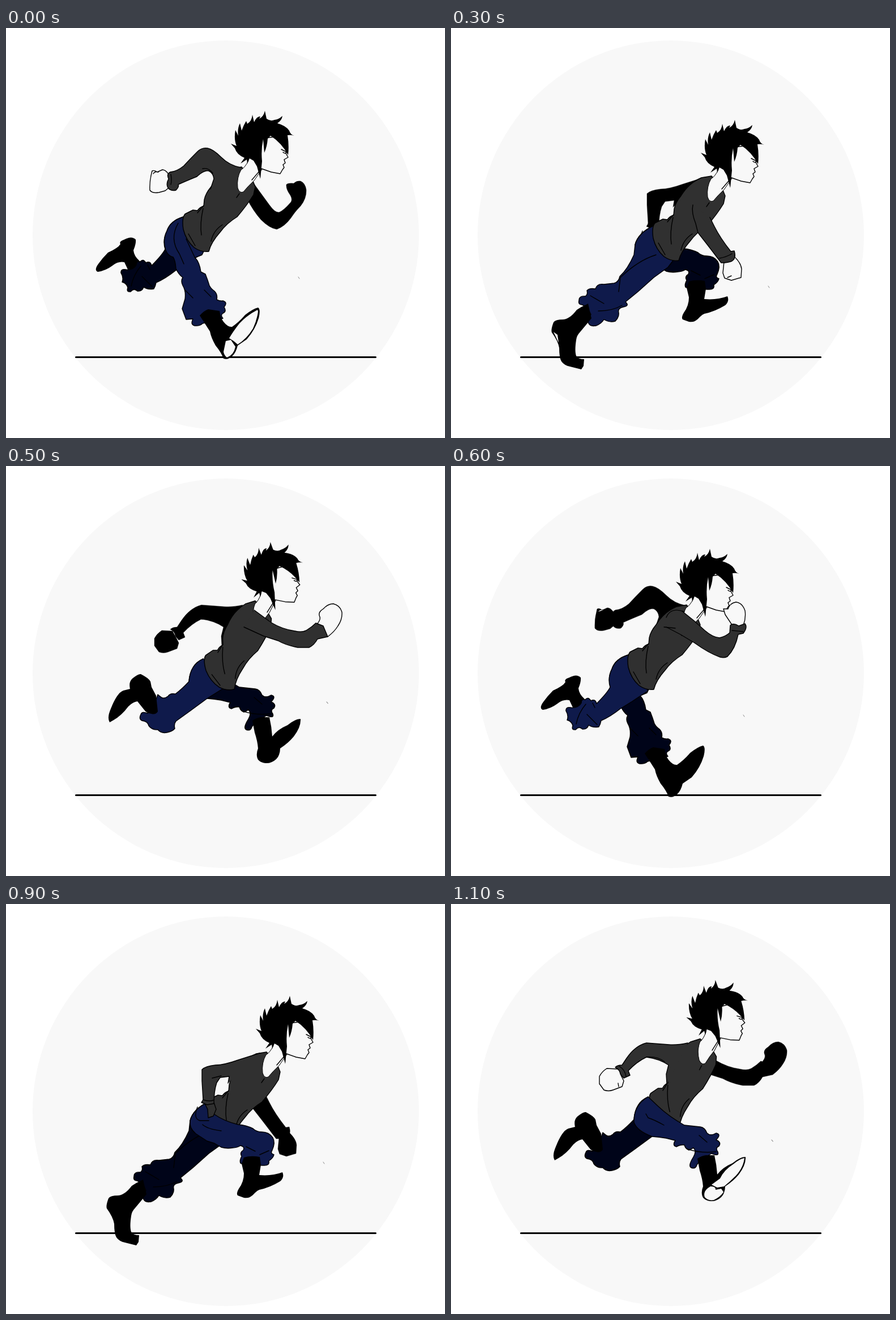
An HTML page without scripts that plays this animation: 775 by 723 pixels, repeating every 1200 ms.

```html
<!DOCTYPE html>
<html lang="en">
<head>
<meta charset="utf-8">
<title>Run cycle</title>
<style>
html, body { margin: 0; width: 100%; height: 100%; overflow: hidden; background: #fff; }
svg { display: block; width: 100%; height: 100%; }
path { stroke: #000; stroke-width: 1.4; stroke-linejoin: round; stroke-linecap: round; }
.near { --s: #303030; --p: #0f1a4b; --w: #f8f8f8; --line: 1.4; }
.far { --s: #000; --p: #000419; --w: #000; --line: .4; }
.s { fill: var(--s); stroke-width: var(--line); }
.p { fill: var(--p); }
.w { fill: var(--w); stroke-width: var(--line); }
.n { fill: none; }
.ink { stroke: none; }
.sole { fill: var(--w); stroke: none; }
.shirt { fill: #303030; }
.skin { fill: #f8f8f8; }
.pose { visibility: hidden; animation: show 1.2s step-end infinite; animation-delay: calc(var(--i) * 100ms - 1200ms); }
@keyframes show {
  0% { visibility: visible; }
  8.33333%, 100% { visibility: hidden; }
}
</style>
</head>
<body>
<svg viewBox="0 0 775 723">
<defs>
  <!-- torso and head move as one piece -->
  <g id="body">
    <path class="shirt" d="M416 245L398 248Q375 258 362 280Q352 292 350 303L349 314Q342 316 338 322L330 321L316 328Q310 335 313 355Q318 375 332 387Q345 396 358 394Q362 378 378 360Q390 344 408 333Q426 312 437 294L440 280L436 270Z"/>
    <path class="n" d="M349 313L338 326M348 318Q342 345 345 365M322 363L334 384M382 347Q366 357 362 376M412 292l-5 7"/>
    <path class="skin" style="stroke-width:1" d="M428 234Q422 246 415 250Q407 264 409 282Q412 292 419 289Q428 278 438 269L452 249"/>
    <path class="skin" d="M450 195L490 190L496 212L494 221L498 228L491 232L493 238L489 241L491 246L488 250L484 257L468 254L451 248L434 268"/>
    <path class="ink" d="M509 190Q503 188 497 189Q500 207 498 224Q487 203 467 190L462 195Q461 209 456 220L454 196Q450 215 452 235L449 266L443 244L437 234L430 230L426 239L425 232L414 239L421 229Q407 223 404 212L397 204L407 208Q402 196 405 180L410 190Q408 178 413 168L416 181Q419 172 424 164L426 169Q434 164 435 153L438 166Q443 155 449 156L447 160Q455 156 457 146L460 160Q467 165 474 162Q482 161 488 155Q487 163 479 168Q494 172 500 181Q502 188 509 190Z"/>
    <path class="n" d="M486 214l8 4M489 219q3 3 6 1"/>
    <path class="n" style="stroke:#888;stroke-width:1" d="M516 439l2 3"/>
  </g>
  <use id="body-b" href="#body" transform="translate(-23 41) rotate(-5 457 148)"/>
  <use id="body-c" href="#body" transform="translate(12 32) rotate(-2 457 148)"/>
  <use id="body-d" href="#body" transform="translate(44 16)"/>
  <use id="body-e" href="#body" transform="translate(10 -28) rotate(-7 457 148)"/>
  <use id="body-f" href="#body" transform="translate(10 -12) rotate(-8 457 148)"/>

  <!-- contact -->
  <g id="a-arm-back">
    <path class="w" d="M287 258Q282 250 276 250L267 254Q262 250 258 252Q253 270 254 286Q258 292 270 290L281 287L287 282M260 257q3-5 9-3"/>
    <path class="s" d="M414 246Q394 242 380 228Q366 214 356 212Q346 210 338 218Q324 232 314 243Q302 253 290 254Q283 257 287 266Q282 275 286 282Q291 288 300 286Q306 280 304 276Q322 268 337 262Q350 250 358 252Q366 256 367 266L361 284"/>
    <path class="n" d="M347 248q11-2 18 8M291 258q2 10 0 18"/>
  </g>
  <path id="a-arm-far" class="s" d="M438 275Q446 286 465 312Q475 326 482 325Q490 322 503 307Q506 302 502 295Q494 284 495 276Q498 273 508 274Q513 269 520 270Q528 273 530 285Q531 300 520 314Q510 324 503 335Q492 350 478 355Q465 353 450 338Q436 322 426 302Z"/>
  <g id="a-arm-front">
    <path class="w" d="M496 280L484 262L481 252L489 252Q492 242 503 240Q514 241 519 255Q521 268 516 281"/>
    <path class="s" d="M408 256L428 272L448 290Q462 302 474 303Q486 300 492 294L493 281Q498 276 508 282L519 278Q524 285 516 295L507 297Q502 322 488 336Q482 339 475 337Q455 330 430 312L405 297L380 284"/>
    <path class="n" d="M380 267Q388 248 412 257M376 284l20 2M496 290l20 2"/>
  </g>
  <g id="a-leg-front">
    <path class="p" d="M313 333Q290 340 284 358Q276 374 282 392Q286 402 295 404Q299 410 300 424Q304 434 312 440Q308 446 312 454Q318 464 316 478L311 495L318 514L330 513Q325 523 333 525Q342 526 347 521L383 512Q378 506 383 503Q390 500 385 492Q392 484 383 481Q378 482 372 479Q374 470 368 464Q362 460 359 454Q356 444 352 434L344 430Q342 414 334 405L346 400L350 392"/>
    <path class="n" d="M304 344Q288 372 306 398L314 416M318 372l16 34M316 462l14 14M350 462l12 12"/>
    <path class="ink" d="M342 507Q350 498 357 496L377 499Q379 512 384 518Q392 528 399 527Q412 518 422 506Q436 495 445 493Q450 496 446 512Q440 532 425 549L409 560Q406 572 400 578Q392 586 384 583Q380 572 370 560Q362 546 360 535Z"/>
    <path class="sole" d="M444 497Q426 506 412 521Q401 535 394 547Q403 552 409 558Q425 548 436 530Q443 515 445 500ZM388 552L397 550L405 562Q402 577 390 581Q385 577 384 571Z"/>
  </g>
  <g id="a-leg-back">
    <path class="ink" d="M162 430Q155 427 163 416Q170 406 180 396Q198 388 202 381Q199 376 209 373Q222 366 229 373Q230 380 225 392Q226 402 235 410L245 425L218 432L209 413Q198 411 188 419Q176 428 162 430Z"/>
    <path class="p" d="M313 333Q290 340 284 358Q276 374 281 390Q276 400 257 419Q255 410 247 414Q242 406 237 412Q230 410 230 418Q225 427 212 426Q202 424 203 432Q208 440 205 448Q213 450 215 458Q212 466 220 465Q226 458 232 464Q240 465 243 457Q250 462 261 460Q264 455 265 449Q280 443 299 428L320 415L347 397"/>
    <path class="n" d="M238 420Q225 435 221 455M240 438l18 18M250 418l4 8"/>
  </g>

  <!-- down -->
  <g id="b-arm-back">
    <path class="w" d="M266 306L260 304L254 312Q248 312 246 308Q252 303 251 299Q244 294 236 297Q226 304 219 318Q220 328 230 334Q238 342 247 342L258 341L268 335"/>
    <path class="s" d="M388 290Q355 283 327 271Q305 278 295 286Q280 301 262 305L266 318L262 334Q282 334 300 323Q315 311 325 308L345 308L360 314"/>
  </g>
  <g id="b-arm-front">
    <path class="ink" d="M517 334Q512 326 514 317Q516 304 526 302L535 308Q540 305 548 306Q556 310 554 318Q550 336 543 346L534 348Z"/>
    <path class="s" d="M386 291Q370 294 361 303Q354 312 362 322Q385 339 415 350Q440 364 472 378Q490 374 510 360L530 353L536 346L528 342L526 334L512 330Q490 346 475 346Q455 337 440 326Q420 312 407 294"/>
    <path class="n" d="M508 340l20 6M404 342l-6 6"/>
  </g>
  <g id="b-leg-back">
    <path class="ink" d="M280 480Q266 478 259 473L258 463Q246 455 239 455Q230 456 226 462Q220 474 217 482L220 484Q200 498 187 520Q182 534 190 534Q200 532 206 520Q212 513 224 508Q234 503 245 503L268 508L280 502Z"/>
    <path class="p" d="M305 384Q280 392 277 412Q275 428 279 446Q283 456 292 462L297 474Q286 470 277 474Q270 484 277 492Q272 504 268 513Q268 522 276 524Q284 522 288 516Q296 526 302 522Q306 514 312 514L330 518L350 520Q365 512 362 500Q372 490 362 482Q354 474 348 477Q346 470 340 466L344 446"/>
    <path class="n" d="M296 396Q288 420 307 440L323 468M314 430l18 32M297 474l10 14"/>
  </g>
  <g id="b-leg-front">
    <path class="ink" d="M316 516Q306 540 290 560Q280 568 276 576Q276 583 286 582Q300 581 310 583Q328 589 345 589L370 588Q376 584 370 578Q360 570 345 568L330 564Q326 555 335 545L342 526Z"/>
    <path class="p" d="M305 384Q280 392 277 412Q275 428 279 446L292 470L305 500L310 519L328 520Q334 528 342 527Q340 537 347 538Q355 538 355 526Q362 526 368 524Q372 518 369 514Q376 508 366 502Q370 490 362 482L340 466L344 446"/>
  </g>

  <!-- passing -->
  <g id="c-arm-back">
    <path class="w" d="M346 368L342 384Q344 396 352 396L366 394L371 382L366 368"/>
    <path class="s" d="M420 276L390 280L355 296L329 322L332 345L343 371L368 372L360 344L362 330L385 314L398 310"/>
  </g>
  <g id="c-arm-front">
    <path class="w" d="M506 350L516 342L530 350L532 368L520 378L508 374"/>
    <path class="s" d="M432 296L448 325L462 350L485 358L506 349L512 360L508 377L485 386L460 388L434 366L412 340L404 320"/>
  </g>
  <g id="c-leg-back">
    <path class="p" d="M331 368Q304 376 302 398Q296 430 282 460Q272 468 270 475L262 500Q254 512 262 520Q270 514 275 520Q280 534 290 528Q298 518 310 528L324 512L345 472L378 426"/>
    <path class="ink" d="M268 514L255 545L232 570Q230 584 245 586L300 590Q314 586 304 577L275 566L284 548L304 520Z"/>
  </g>
  <g id="c-leg-front">
    <path class="ink" d="M358 498L328 512L308 516L298 540Q290 566 300 570L312 560L322 545L345 540L378 515Z"/>
    <path class="p" d="M331 368Q304 376 302 398Q306 425 330 445L350 466Q352 478 340 488Q336 500 345 515Q354 506 362 510Q372 524 386 510Q390 496 402 490Q408 478 418 468Q418 458 412 450L400 440L378 426"/>
    <path class="n" d="M322 385Q316 410 345 430M372 470l10 16"/>
  </g>

  <!-- push -->
  <g id="d-arm-back">
    <path class="s" d="M350 350L356 362L357 377L366 374L371 362L367 350Z"/>
    <path class="s" d="M448 263L410 275Q385 284 370 284Q352 286 346 292L346 312L348 345L345 350L355 354L367 352Q367 330 372 315L378 306L394 304L392 316"/>
    <path class="n" d="M348 345q10 4 18 1M364 307l16-4"/>
  </g>
  <g id="d-arm-front">
    <path class="w" d="M499 402Q512 414 513 425L512 440L495 445L483 441L480 432L482 412M488 440l7-3"/>
    <path class="s" d="M427 312Q424 325 432 345L436 361Q455 385 470 405L477 414Q490 414 496 411Q504 406 500 393L494 394Q475 370 465 350L457 334"/>
    <path class="n" d="M474 406q12-2 22-8"/>
  </g>
  <g id="d-leg-back">
    <path class="p" d="M357 349Q330 362 325 382L323 400Q312 425 298 438Q296 448 288 450L270 452Q258 450 255 460Q244 458 240 463Q242 470 237 473Q226 472 226 480Q224 488 231 488Q240 490 247 505Q240 516 243 521Q246 527 256 525Q265 522 270 514Q280 520 290 517Q297 510 296 502Q294 494 304 492Q316 490 308 483L330 465L358 440L383 422L392 410"/>
    <path class="n" d="M362 400Q330 410 299 440L296 465M246 472l24 14M260 499q25 0 42-10"/>
    <path class="ink" d="M242 486L230 492L222 497Q210 513 198 514Q184 514 181 519Q176 532 178 537Q189 552 191 564Q191 582 195 588Q200 595 210 597L230 602L234 596L235 584Q224 584 221 578Q218 570 221 550Q222 542 228 536Q238 524 248 512Z"/>
    <path class="sole" d="M181 536L188 541L190 555Z"/>
  </g>
  <g id="d-leg-front">
    <path class="p" d="M357 349Q330 362 325 382Q323 395 335 405L355 418L368 422L380 429Q390 432 400 430Q408 430 414 426Q422 428 419 434Q412 438 416 445Q412 452 414 457Q424 462 430 457L440 454Q446 462 454 461Q466 462 464 453Q472 448 473 442Q466 440 470 434Q476 420 471 412Q464 402 452 402Q442 402 436 396Q424 390 410 389Q385 383 368 371"/>
    <path class="n" d="M347 389Q356 397 380 400M338 358Q330 378 342 382L358 382M424 428l16 8M448 442l16-7"/>
    <path class="ink" d="M420 447Q432 443 448 446L450 460L447 478Q470 480 488 473Q492 482 484 489Q466 500 447 504Q442 506 438 511Q430 520 420 518L409 514Q406 510 411 502Q420 490 420 475L416 458Z"/>
  </g>

  <!-- leap -->
  <g id="e-arm-back">
    <path class="w" d="M296 296L283 312Q281 322 284 330L292 342L308 343Q320 340 322 332L320 320L312 315L318 305"/>
    <path class="s" d="M412 236L380 243L330 250Q320 262 310 276L290 302L315 309Q320 294 333 285Q344 273 355 272L386 269"/>
  </g>
  <g id="e-arm-front">
    <path class="w" d="M563 256Q558 244 567 234L575 241L590 242L605 248L598 262L592 278L574 279M567 234L569 244"/>
    <path class="s" d="M434 236L450 246L480 260L495 268L510 268L540 262L560 257L565 254L572 262L575 280L566 287L535 292L500 306L480 300L455 288L440 280L417 271"/>
    <path class="n" d="M562 258q6 10 4 24"/>
  </g>
  <g id="e-leg-back">
    <path class="p" d="M346 321Q325 330 312 345L300 365L284 378Q278 370 268 371Q256 374 252 378Q244 380 238 386Q226 384 227 392Q230 399 237 401Q230 412 240 416Q248 420 256 429Q266 426 272 418L283 420L300 407L340 392L370 380L388 383"/>
    <path class="n" d="M306 363Q290 372 281 394M265 414q12 5 20 3"/>
    <path class="ink" d="M235 388L234 370L230 362L205 365L171 367Q178 350 195 335L228 327L240 315L258 314L262 345L259 386Z"/>
    <path class="sole" d="M174 364Q180 348 197 337L227 329L224 335L200 344L182 362ZM229 322L240 317L256 315L254 320L232 328Z"/>
  </g>
  <g id="e-leg-front">
    <path class="p" d="M346 321L390 345Q430 330 455 325Q464 320 470 324Q474 316 482 317Q494 318 497 328Q492 336 497 342Q500 350 494 358Q500 370 488 373L475 368L462 375Q452 378 449 368Q440 372 425 370Q416 368 410 373Q404 378 398 374L385 382L350 372"/>
    <path class="ink" d="M456 366L488 362L489 388L495 392Q515 380 526 368Q538 361 546 363Q546 374 528 398Q514 412 496 418L496 427Q485 434 475 436Q468 434 466 427L460 405Z"/>
  </g>

  <!-- float -->
  <g id="f-arm-back">
    <path class="w" d="M294 291L275 290Q266 296 262 304L262 317L270 328Q278 331 286 328L302 322L305 312L300 302M295 316l1 6"/>
    <path class="s" d="M418 245Q400 249 385 248L345 245Q325 250 310 272L302 284Q294 284 290 288Q298 292 299 300L305 307L316 302L313 294Q328 278 345 270Q368 273 384 284L380 300L381 318"/>
    <path class="n" d="M297 286q10 6 12 18M345 270q18-2 32 8"/>
  </g>
  <g id="f-arm-front">
    <path class="w" d="M547 281Q556 272 554 266Q550 258 560 252Q568 243 578 243Q590 246 593 258Q594 270 586 282Q580 292 568 301"/>
    <path class="s" d="M438 254L468 276Q488 288 510 291Q522 294 530 290Q540 284 547 277L560 282L568 301L550 305Q544 316 535 320L515 320Q494 316 480 308L455 300L420 284"/>
  </g>
  <g id="f-leg-back">
    <path class="p" d="M348 340Q325 350 323 380Q310 394 299 402Q290 400 286 406Q278 412 273 407L268 403L262 420L250 436Q240 432 238 438Q234 446 240 449Q250 450 252 458Q258 466 268 465Q274 472 284 470Q294 468 298 463Q296 455 300 450L325 432L355 410L395 385"/>
    <path class="ink" d="M265 405L268 433Q264 439 257 437Q248 436 244 430L232 415Q224 416 216 424Q204 440 190 448L183 452Q178 444 185 428Q196 400 207 396L219 393Q216 380 224 374Q234 366 238 367Q252 374 255 380L257 390Z"/>
  </g>
  <g id="f-leg-front">
    <path class="p" d="M348 340Q322 355 323 385Q328 400 355 410Q368 411 380 413L396 417Q390 426 398 428Q406 424 412 425Q414 432 420 434L428 430Q434 436 428 446Q418 462 424 465Q432 468 434 460L440 452L460 440Q474 446 471 437Q466 430 473 427Q478 420 468 416Q478 406 468 404Q458 410 452 404Q448 394 440 393L412 390Q385 375 366 357Z"/>
    <path class="n" d="M344 370l4 7Q358 380 376 390M417 432Q440 440 468 437M438 408l14 12"/>
    <path class="ink" d="M435 449Q442 444 450 443L465 443Q469 460 470 477Q480 464 497 457Q510 446 520 446Q521 460 508 477Q498 489 484 498Q484 510 477 517Q468 525 458 524Q444 522 443 512Q442 505 445 498Q444 485 439 470Z"/>
    <path class="sole" d="M518 448Q510 449 498 459Q482 469 475 484L460 495L470 500L482 498Q492 490 503 479Q516 465 518 448ZM458 498Q444 506 448 517Q454 524 464 522Q476 516 481 508L477 502L467 504Q468 498 458 498Z"/>
  </g>
</defs>

<ellipse cx="388" cy="365.5" rx="341" ry="343.5" fill="#f8f8f8"/>
<path d="M123.5 580.5H652.5" style="stroke-width:3"/>

<g class="pose" style="--i:0">
  <g class="far"><use href="#a-arm-far"/><use href="#a-leg-back"/></g>
  <g class="near"><use href="#a-leg-front"/><use href="#body"/><use href="#a-arm-back"/></g>
</g>
<g class="pose" style="--i:1">
  <g class="far"><use href="#b-arm-front"/><use href="#b-leg-back"/></g>
  <g class="near"><use href="#b-leg-front"/><use href="#body-b"/><use href="#b-arm-back"/></g>
</g>
<g class="pose" style="--i:2">
  <g class="far"><use href="#c-arm-back"/><use href="#c-leg-front"/></g>
  <g class="near"><use href="#c-leg-back"/><use href="#body-c"/><use href="#c-arm-front"/></g>
</g>
<g class="pose" style="--i:3">
  <g class="far"><use href="#d-arm-back"/><use href="#d-leg-front"/></g>
  <g class="near"><use href="#d-leg-back"/><use href="#body-d"/><use href="#d-arm-front"/></g>
</g>
<g class="pose" style="--i:4">
  <g class="far"><use href="#e-arm-back"/><use href="#e-leg-front"/></g>
  <g class="near"><use href="#e-leg-back"/><use href="#body-e"/><use href="#e-arm-front"/></g>
</g>
<g class="pose" style="--i:5">
  <g class="far"><use href="#f-arm-back"/><use href="#f-leg-front"/></g>
  <g class="near"><use href="#f-leg-back"/><use href="#body-f"/><use href="#f-arm-front"/></g>
</g>
<g class="pose" style="--i:6">
  <g class="far"><use href="#a-arm-back"/><use href="#a-leg-front"/></g>
  <g class="near"><use href="#a-leg-back"/><use href="#body"/><use href="#a-arm-front"/></g>
</g>
<g class="pose" style="--i:7">
  <g class="far"><use href="#b-arm-back"/><use href="#b-leg-front"/></g>
  <g class="near"><use href="#b-leg-back"/><use href="#body-b"/><use href="#b-arm-front"/></g>
</g>
<g class="pose" style="--i:8">
  <g class="far"><use href="#c-arm-front"/><use href="#c-leg-back"/></g>
  <g class="near"><use href="#c-leg-front"/><use href="#body-c"/><use href="#c-arm-back"/></g>
</g>
<g class="pose" style="--i:9">
  <g class="far"><use href="#d-arm-front"/><use href="#d-leg-back"/></g>
  <g class="near"><use href="#body-d"/><use href="#d-leg-front"/><use href="#d-arm-back"/></g>
</g>
<g class="pose" style="--i:10">
  <g class="far"><use href="#e-arm-front"/><use href="#e-leg-back"/></g>
  <g class="near"><use href="#body-e"/><use href="#e-leg-front"/><use href="#e-arm-back"/></g>
</g>
<g class="pose" style="--i:11">
  <g class="far"><use href="#f-arm-front"/><use href="#f-leg-back"/></g>
  <g class="near"><use href="#body-f"/><use href="#f-leg-front"/><use href="#f-arm-back"/></g>
</g>
</svg>
</body>
</html>
```
